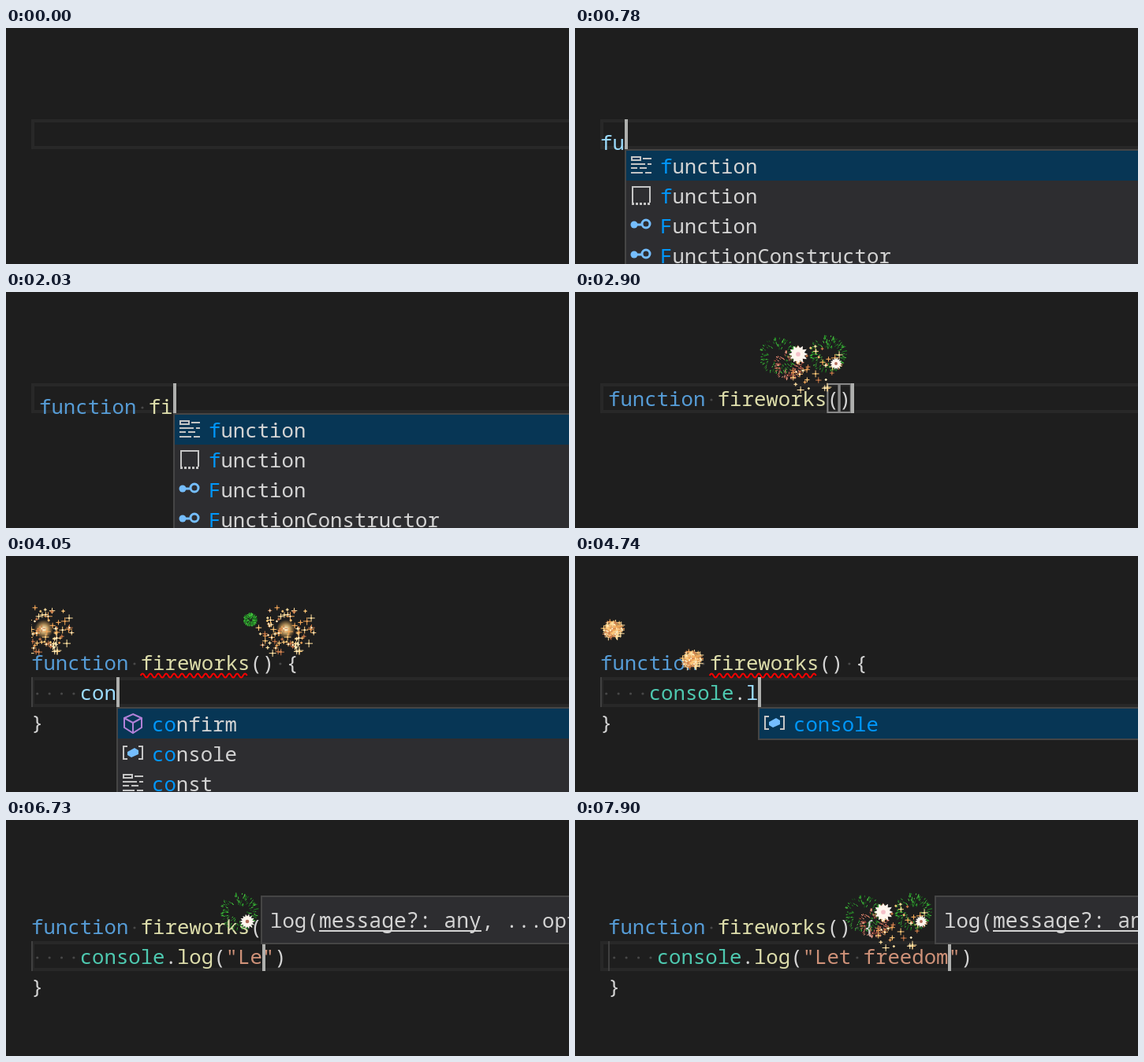
These frames come from a looping animation (714 by 300 pixels, 7.99 s). An HTML page with a canvas:

```html
<!DOCTYPE html>
<html lang="en">
<head>
<meta charset="utf-8">
<title>Fireworks editor</title>
<style>
html, body { margin: 0; height: 100%; overflow: hidden; background: #1e1e1e; }
canvas { display: block; }
</style>
</head>
<body>
<canvas id="stage" width="714" height="300"></canvas>
<script>
const ctx = document.getElementById('stage').getContext('2d', { alpha: false });
const LOOP = 7990, LEFT = 32, TOP = 116, ROW = 38, COL = 15.41, LAG = 140, CYCLE = 1250;
const GRAY = '#d4d4d4', YELLOW = '#dcdcaa', PANEL = '#2d2d30', EDGE = '#454545';

// Typing runs: start, interval, characters, shake per key (1 = right, 2 = down)
const keys = [
  [550, 117, 'functio', '1203120'],
  [1490, 140, 'n fire', '102310'],
  [2260, 104, 'works(', '120312'],
  [2900, 0, ')', '1'],
  [3120, 150, ' {', '03'],
  [3600, 0, '\n', '1'],
  [3800, 100, 'co', '20'],
  [4050, 0, 'n', '0'],
  [4200, 106, 'sole.log(', '120130213'],
  [5510, 0, '"', '1'],
  [6350, 230, 'Le', '00'],
  [6810, 124, 't freedom', '102130201']
].flatMap(([start, step, text, shakes]) =>
  [...text].map((char, i) => ({ time: start + i * step, char, shake: +shakes[i] })));

// Explosions: start, end, left, top
const explosions = [
  [550, 1500, -18, 53], [900, 1900, 12, 53], [1250, 2100, 42, 53],
  [1800, 2500, 100, 53], [2260, 2800, 180, 53], [2780, 3500, 235, 53],
  [3120, 4200, 287, 53], [3600, 5000, -20, 53], [4350, 5050, 80, 91],
  [5050, 5800, 188, 99], [5510, 6500, 204, 91], [6580, 7100, 210, 91],
  [7130, 7600, 280, 91], [7600, 7990, 343, 91]
];

const headItems = [['function', 'keyword'], ['function', 'snippet'],
  ['Function', 'type'], ['FunctionConstructor', 'type']];
const bodyItems = [['confirm', 'method'], ['console', 'variable'], ['const', 'keyword'],
  ['ConstantSourceNode', 'type'], ['log', 'method']];

const random = n => { const v = Math.sin(n * 12.9898) * 43758.5453; return v - Math.floor(v); };
const typedAt = t => keys.filter(k => k.time <= t).map(k => k.char).join('');

function rect(x, y, w, h, color) {
  ctx.fillStyle = color;
  ctx.fillRect(x, y, w, h);
}
function frame(x, y, w, h, line, color) {
  ctx.strokeStyle = color;
  ctx.lineWidth = line;
  ctx.strokeRect(x + line / 2, y + line / 2, w - line, h - line);
}
function write(text, x, y, color, size = 25.7) {
  ctx.font = `${size}px "Noto Sans Mono", monospace`;
  ctx.fillStyle = color;
  ctx.fillText(text, x, y);
}
function stroke(path, color, width = 2) {
  ctx.strokeStyle = color;
  ctx.lineWidth = width;
  ctx.stroke(new Path2D(path));
}
function disc(x, y, r, color) {
  ctx.fillStyle = color;
  ctx.beginPath();
  ctx.arc(x, y, r, 0, 7);
  ctx.fill();
}

function tokenColor(token, index, rest) {
  if (token[0] === '"') return '#ce9178';
  if (!/\w/.test(token)) return GRAY;
  if (token === 'function') return '#569cd6';
  if (token === 'console' && rest[0] === '.') return '#4ec9b0';
  return token === 'log' || index === 9 ? YELLOW : '#9cdcfe';
}

function codeLine(text, x, baseline) {
  for (const { 0: token, index } of text.matchAll(/".*"|\w+|\S/g)) {
    const color = tokenColor(token, index, text.slice(index + token.length));
    write(token, x + index * COL, baseline, color);
  }
  [...text].forEach((char, i) => {
    if (char === ' ') disc(x + (i + .5) * COL, baseline - 8, 1.6, '#484848');
  });
}

const icons = {
  keyword() {
    stroke('M1 2h11v4H1zM15 4h11M0 11h18M21 11h5M0 16h8M11 16h9M0 22h15M18 22h8', '#c5c5c5');
  },
  snippet() {
    stroke('M2 22V2H24V22', '#c5c5c5');
    for (let x = 1; x < 25; x += 5) rect(x, 22, 3, 3, '#c5c5c5');
  },
  type() {
    disc(4, 12, 4.5, '#75beff');
    stroke('M4 12H14M24 11a5 5 0 1 0-10 0a5 5 0 1 0 10 0', '#75beff', 3);
  },
  method() {
    stroke('M13 1L24 6V18L13 25L2 18V6ZM2 6L13 12L24 6M13 12V25', '#b180d7');
  },
  variable() {
    stroke('M6 4H1V20H6M20 4H25V20H20', '#c5c5c5');
    ctx.fillStyle = '#75beff';
    ctx.fill(new Path2D('M6 11L15 6L20 9V14L11 18L6 15Z'));
  }
};

function suggestions(items, prefix, x, y) {
  rect(x, y, 714, items.length * ROW + 4, PANEL);
  rect(x + 2, y + 2, 714, ROW, '#073655');
  frame(x, y, 900, items.length * ROW + 4, 2, EDGE);
  items.forEach(([name, icon], i) => {
    const top = y + 2 + i * ROW, textX = x + 45;
    ctx.save();
    ctx.translate(x + 8, top + 6);
    icons[icon]();
    ctx.restore();
    write(name.slice(0, prefix), textX, top + 29, '#0097fb');
    write(name.slice(prefix), textX + prefix * COL, top + 29, GRAY);
  });
}

function parameterHint(x) {
  rect(x, 96, 714, 62, PANEL);
  frame(x, 96, 900, 62, 2, EDGE);
  write('log(', x + 12, 137, GRAY);
  write('message?: any', x + 74, 137, GRAY, 26.4);
  rect(x + 74, 140, 206, 2, GRAY);
  write(', ...optionalParams', x + 280, 137, GRAY);
}

function sparkles(x, y, age) {
  const spread = 36 * Math.min(1, .25 + age * 1.6);
  const count = age < .8 ? 85 : 85 - (age - .8) * 420;
  if (age < .82) {
    const glow = ctx.createRadialGradient(x, y, 1, x, y, 12);
    glow.addColorStop(0, '#fff4d0');
    glow.addColorStop(.4, '#ffd080b0');
    glow.addColorStop(1, '#ffb05000');
    disc(x, y, 12, glow);
  }
  for (let i = 1; i < count; i++) {
    const angle = random(i) * 6.283, r = random(i + 200) ** .6 * spread;
    const px = x + Math.cos(angle) * r, py = y + Math.sin(angle) * r * .95 + age ** 4 * 3;
    const size = 1.5 + random(i + 400) ** 2 * 4;
    const color = ['#ffe0a0', '#f0a558', '#c87848', '#ffc878'][i % 4];
    rect(px - size, py - .5, size * 2, 1, color);
    rect(px - .5, py - size, 1, size * 2, color);
    rect(px - 1, py - 1, 2, 2, i % 3 ? color : '#fff4d0');
  }
}

function dashes(x, y, radius, age, colors, seed) {
  const reach = radius * Math.min(1, .35 + age * 3);
  for (let i = 1; i < 190; i++) {
    if (random(i + seed + 700) < age * age * .8) continue;
    const angle = random(i + seed) * 6.283, r = reach * (.35 + .65 * random(i + seed + 300) ** .6);
    const c = Math.cos(angle), s = Math.sin(angle), length = 1.5 + random(i + seed + 500) * 2;
    stroke(`M${x + c * r} ${y + s * r}l${-c * length} ${-s * length}`, colors[i % colors.length], 1);
  }
}

function flower(x, y, radius, spikes, center) {
  ctx.fillStyle = '#fff6ee';
  ctx.beginPath();
  for (let i = 0; i < spikes * 2; i++) {
    const angle = i * Math.PI / spikes, r = i % 2 ? radius * .62 : radius * (.85 + .15 * random(i + 9));
    ctx.lineTo(x + Math.cos(angle) * r, y + Math.sin(angle) * r);
  }
  ctx.fill();
  disc(x, y, radius * .22, center);
}

const greens = ['#35b535', '#1f7a22', '#48cf40', '#185a1a'];
const reds = ['#e07860', '#b84a3c', '#f0a088'];
// Parts of one explosion: start in the cycle, lifetime, drawing by age
const parts = [
  [300, 170, (x, y, age) => dashes(x + 23, y + 28, 25, age, greens, 11)],
  [310, 75, (x, y, age) => dashes(x + 52, y + 28, 27, age, greens, 83)],
  [375, 420, (x, y, age) => dashes(x + 86, y + 26, 25, age + .15, greens, 47)],
  [310, 155, (x, y, age) => dashes(x + 36, y + 40, 20, age, reds, 31)],
  [950, 780, (x, y, age) => sparkles(x + 68, y + 40, age)],
  [335, 130, (x, y, age) => flower(x + 48, y + 26, 11 + age * 4, 12, '#f4c0c8')],
  [375, 260, (x, y, age) => flower(x + 96, y + 38, 8 + age * 6, 14, '#b06a58')]
];

function explode(x, y, phase) {
  for (const [start, life, paint] of parts) {
    const age = ((phase - start + CYCLE) % CYCLE) / life;
    if (age < 1) paint(x, y, age);
  }
}

function draw(t) {
  const text = typedAt(t), lagged = typedAt(t - LAG);
  const last = keys[text.length - 1];
  const idle = last ? t - last.time : 0;
  const shake = last && idle < 900 ? last.shake : 0;
  const x = LEFT + (shake & 1) * 10, dy = (shake & 2) * 5;
  const [head, body] = text.split('\n');
  const inBody = body !== undefined;
  const column = inBody ? body.length + 4 : head.length;
  const top = inBody ? TOP + ROW : TOP;
  const cursorX = x + column * COL;
  const end = text.slice(-1);

  rect(0, 0, 714, 300, '#1e1e1e');
  frame(LEFT, top, 800, ROW, 4, '#282828');

  const closing = { '(': ')', '{': inBody ? '' : '}' };
  codeLine(head + (inBody ? '' : closing[end] || ''), x, TOP + 29 + dy);
  if (inBody) {
    const tail = body.includes('"') ? '")' : closing[end] || '';
    rect(x, top, 2, ROW, '#404040');
    codeLine('    ' + body + tail, x, top + 29 + dy);
    write('}', x, TOP + 2 * ROW + 29, GRAY);
  }
  if (t > 3700 && t < 5510) {
    const wave = 'q2.5 -5 5 0t5 0'.concat('t5 0'.repeat(25));
    stroke(`M${x + 9 * COL} ${TOP + 36 + dy}${wave}`, '#f00', 2);
  }

  if (end && '(){'.includes(end)) {
    const first = column - (end === ')' ? 2 : 1);
    for (const c of [first, first + 1]) frame(x + c * COL, top, 16, ROW, 2, '#888');
  }
  if (last ? idle % 1000 < 500 : t >= 320) rect(Math.round(cursorX), top, 4, ROW, '#aeafad');

  ctx.save();
  ctx.beginPath();
  ctx.rect(LEFT, 0, 714, 300);
  ctx.clip();
  for (const [from, to, ex, ey] of explosions) {
    if (t >= from && t < to) explode(ex, ey, t % CYCLE);
  }
  ctx.restore();

  const word = lagged.match(/\w*$/)[0].toLowerCase();
  if (word && /\w$/.test(text) && !text.includes('"')) {
    const items = (inBody ? bodyItems : headItems)
      .filter(([name]) => name.toLowerCase().startsWith(word));
    if (items.length) suggestions(items, word.length, Math.round(cursorX), top + ROW);
  }
  const laggedBody = lagged.split('\n')[1] || '';
  if (laggedBody.includes('(')) parameterHint(Math.round(x + (laggedBody.length + 4) * COL - 2));
}

function tick() {
  draw(performance.now() % LOOP);
  requestAnimationFrame(tick);
}
tick();
</script>
</body>
</html>
```
